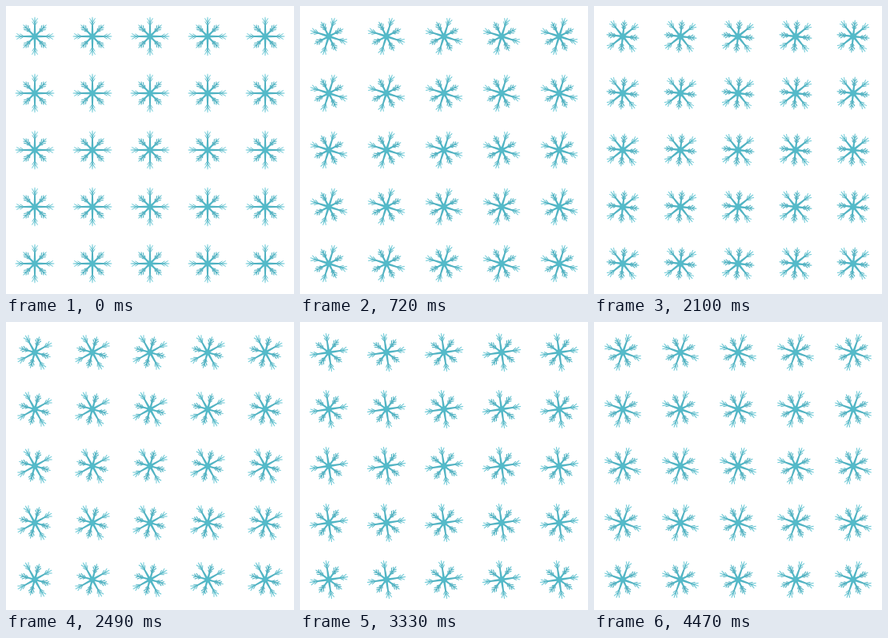
Write an HTML page with a canvas that moves like this. It is 360 px wide and 360 px high and loops after 4.5 s.

```html
<!DOCTYPE html>
<html lang="en">
<head>
<meta charset="utf-8">
<title>Turning snowflakes</title>
<style>
html, body { margin: 0; height: 100%; overflow: hidden; background: #fff; }
canvas { display: block; }
</style>
</head>
<body>
<canvas id="stage" width="360" height="360"></canvas>
<script>
const ctx = document.getElementById('stage').getContext('2d');
const LOOP = 4500;
const DEGREES_PER_SECOND = 24.5;

// Barbs: [root radius, tip radius, half spread]
const longArm = { length: 24.3, root: 1.5, barbs: [[13.5, 18.5, 3.2], [16.5, 22.8, 3.5]] };
const shortArm = { length: 20.5, root: 1.4, barbs: [[8.5, 11.8, 2.6], [11, 15.8, 3.7], [14.5, 18, 2.5]] };

const ice = ctx.createRadialGradient(0, 0, 0, 0, 0, 25);
ice.addColorStop(0, '#54bccb');
ice.addColorStop(0.5, '#50afbf');
ice.addColorStop(0.75, '#5cbdcb');
ice.addColorStop(1, '#70d0dd');

function armPath({ length, root, barbs }) {
  const shaft = new Path2D(`M0 ${-root}L${length} -.45V.45L0 ${root}Z`);
  const twigs = new Path2D();
  for (const [from, to, spread] of barbs) {
    twigs.moveTo(to, -spread);
    twigs.lineTo(from, 0);
    twigs.lineTo(to, spread);
  }
  return { shaft, twigs };
}

const arms = [armPath(longArm), armPath(shortArm)];

function drawFlake(x, y, angle) {
  ctx.save();
  ctx.translate(x, y);
  ctx.rotate(angle);
  ctx.fillStyle = ctx.strokeStyle = ice;
  for (let i = 0; i < 8; i++) {
    const { shaft, twigs } = arms[i % 2];
    ctx.lineWidth = i % 2 ? 1.15 : 0.95;
    ctx.fill(shaft);
    ctx.stroke(twigs);
    ctx.rotate(Math.PI / 4);
  }
  ctx.beginPath();
  ctx.arc(0, 0, 3.6, 0, 2 * Math.PI);
  ctx.fill();
  ctx.restore();
}

function draw() {
  const seconds = (performance.now() % LOOP) / 1000;
  const angle = seconds * DEGREES_PER_SECOND * Math.PI / 180;
  ctx.fillStyle = '#fff';
  ctx.fillRect(0, 0, 360, 360);
  for (let row = 0; row < 5; row++) {
    for (let col = 0; col < 5; col++) drawFlake(36 + 72 * col, 38 + 71 * row, angle);
  }
  requestAnimationFrame(draw);
}
draw();
</script>
</body>
</html>
```
